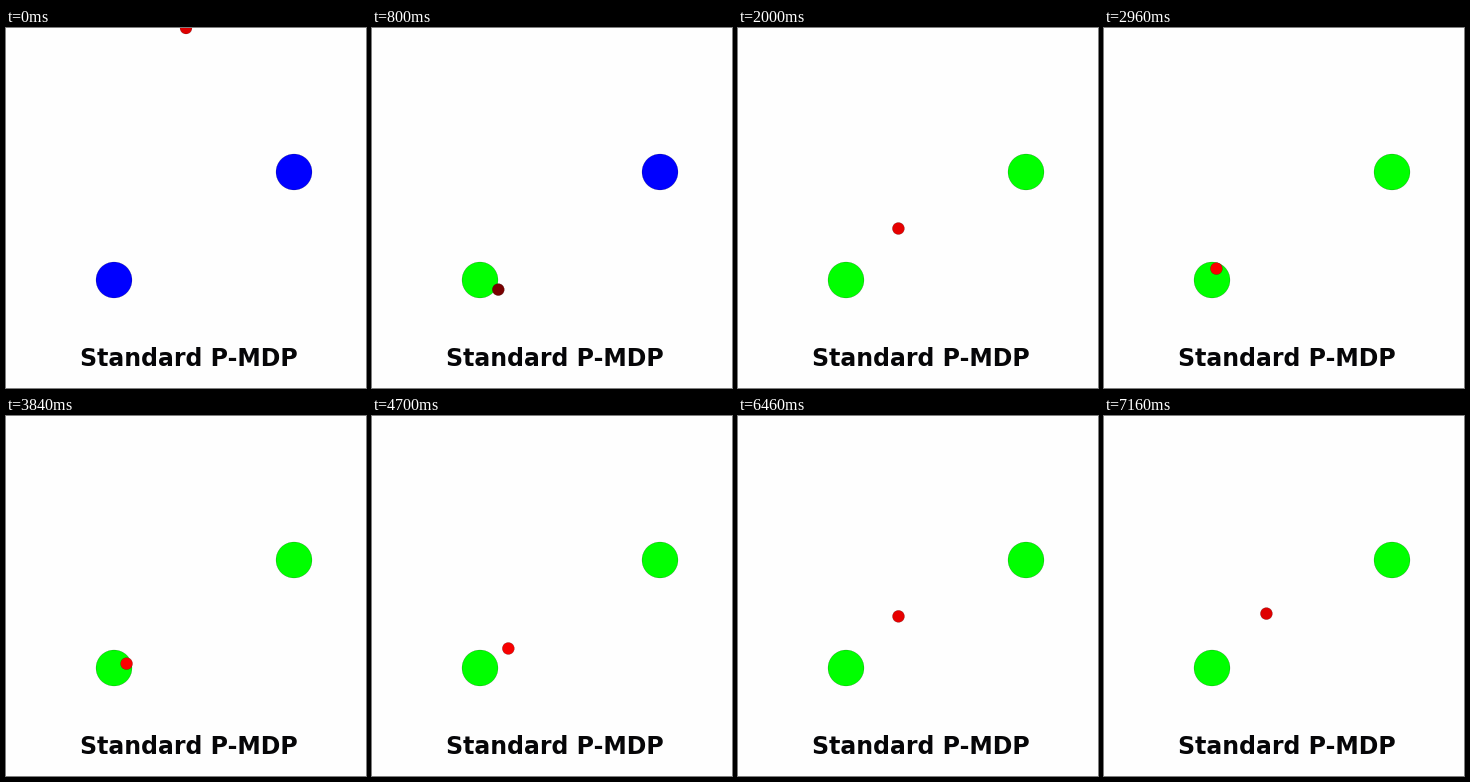
These frames come from a looping animation (360 px wide and 360 px high, 7.18 s). A matplotlib script:

```python
import numpy as np
import matplotlib.pyplot as plt
from matplotlib.animation import FuncAnimation
from matplotlib.patches import Circle

SIZE, DPI = 360, 72
STEP, FRAMES = 20, 359
GOALS = [(108, 252), (288, 144)]
GOAL_R, AGENT_R = 18, 6


def ease_in(u):
    return u ** 1.6


def ease_out(u):
    return 1 - (1 - u) ** 2.2


def smooth(u):
    return u * u * (3 - 2 * u)


# each leg: end time (ms), control point, end point, red level at the end, easing
START, START_RED = (180, 0), 0.87
LEGS = [
    (800, (90, 300), (126.3, 261.6), 0.47, ease_in),
    (1400, (220, 200), (281, 150), 0.95, smooth),
    (2000, (215, 152), (160.4, 200.5), 0.90, ease_in),
    (2960, (135, 238), (112.4, 240.6), 0.99, ease_out),
    (7160, (112.4, 269.8), (162.4, 197.6), 0.87, ease_out),
]


def state_at(t):
    """Position and red level, following one quadratic Bezier per leg."""
    begin, a, red = 0, START, START_RED
    for end, c, b, next_red, ease in LEGS:
        if t <= end:
            break
        begin, a, red = end, b, next_red
    u = (t - begin) / (end - begin)
    s = ease(u)
    x, y = ((1 - s) ** 2 * p + 2 * s * (1 - s) * q + s * s * r
            for p, q, r in zip(a, c, b))
    return x, y, red + (next_red - red) * u * u


TRACK = np.array([state_at(i * STEP) for i in range(FRAMES)])

# a goal lights up as soon as the agent touches it
REACHED = [int(np.argmax(np.hypot(TRACK[:, 0] - x, TRACK[:, 1] - y) < GOAL_R + AGENT_R))
           for x, y in GOALS]

fig = plt.figure(figsize=(SIZE / DPI, SIZE / DPI), dpi=DPI, facecolor="#fefefe")
ax = fig.add_axes([0, 0, 1, 1])
ax.set_xlim(0, SIZE)
ax.set_ylim(SIZE, 0)
ax.axis("off")


def add_disc(center, radius, color):
    disc = Circle(center, radius, facecolor=color, edgecolor="black", linewidth=0.15)
    return ax.add_patch(disc)


goals = [add_disc(center, GOAL_R, "blue") for center in GOALS]
agent = add_disc(START, AGENT_R, "red")
ax.text(73.8, 338, "Standard P-MDP", family="DejaVu Sans", weight="bold",
        size=23.6, color="#060608", va="baseline")


def update(i):
    x, y, red = TRACK[i]
    agent.center = x, y
    agent.set_facecolor((red, 0, 0))
    for goal, reached in zip(goals, REACHED):
        goal.set_facecolor("lime" if i >= reached else "blue")
    return [agent, *goals]


anim = FuncAnimation(fig, update, frames=FRAMES, interval=STEP,
                     repeat=True, repeat_delay=0, blit=False)
plt.show()
```
